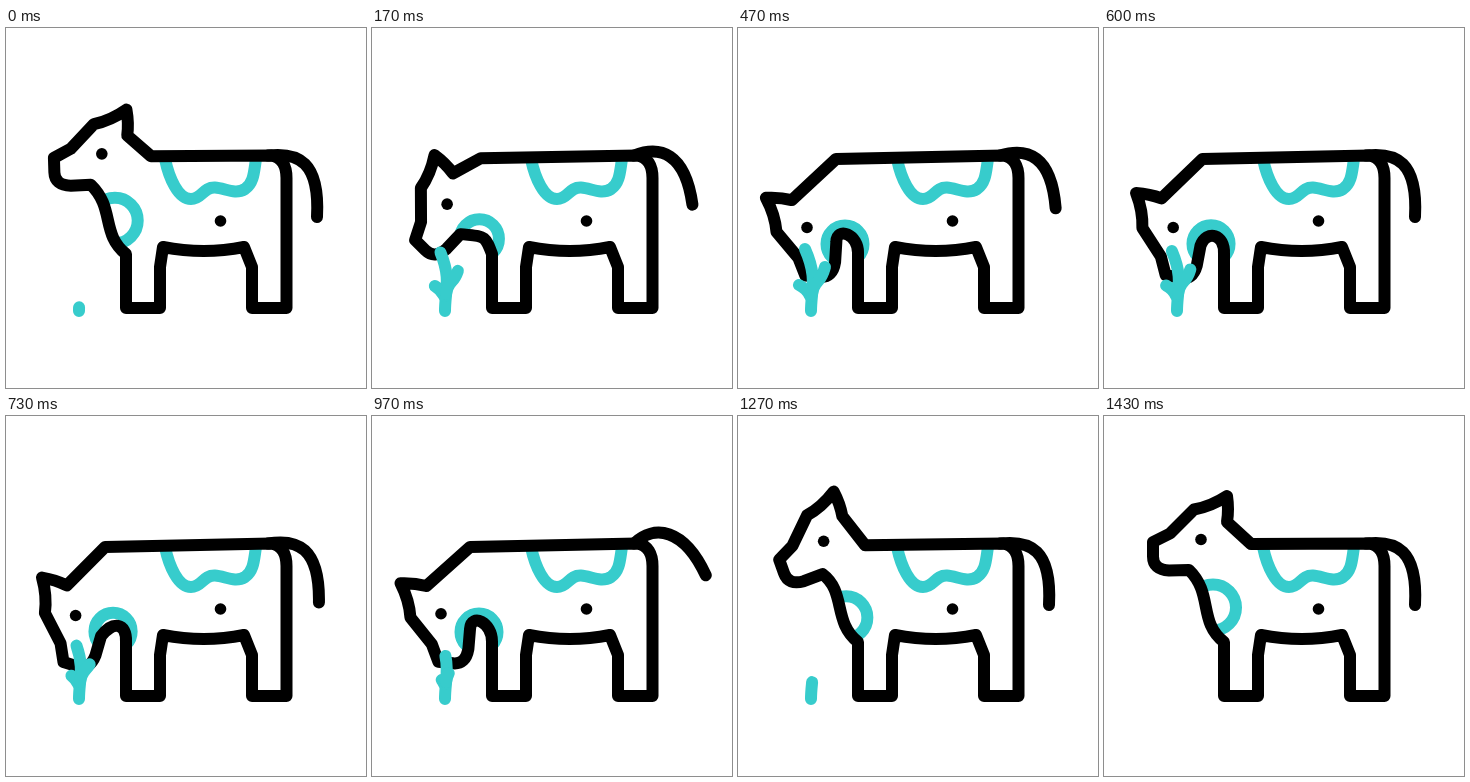
Recreate the animation shown at these times as an HTML page. Size 360 px wide and 360 px high, loop 1670 ms.

```html
<!DOCTYPE html>
<html lang="en">
<head>
<meta charset="utf-8">
<title>Grazing cow</title>
<style>
  html, body { margin: 0; height: 100%; overflow: hidden; background: #fff; }
  svg { display: block; width: 100vw; height: 100vh; }
  path, circle { fill: none; stroke-width: 12; stroke-linecap: round; stroke-linejoin: round; }
  .ink { stroke: #000; }
  .teal { stroke: #37cccc; }
  .dot { fill: #000; }
</style>
</head>
<body>
<svg viewBox="0 0 360 360">
  <clipPath id="inside"><path id="bodyClip"/></clipPath>
  <path class="teal" d="M159 131C163 150 172 171 185 171C196 171 197 159 209 159.500C219 160 229 167 239 161C248 155 248 143 250 131"/>
  <g clip-path="url(#inside)"><circle id="spot" class="teal"/></g>
  <path id="body" class="ink"/>
  <path id="tail" class="ink"/>
  <circle id="eye" class="dot" r="5.8"/>
  <circle class="dot" cx="214.5" cy="193" r="5.8"/>
  <g id="grass" class="teal">
    <path pathLength="1" d="M73 283C73 262 80 250 67 221"/>
    <path pathLength="1" d="M72 268Q69 261 61 257"/>
    <path pathLength="1" d="M74 266C77 250 82 258 87 239"/>
  </g>
</svg>
<script>
const LOOP = 1670, FPS = 30;
const $ = id => document.getElementById(id);
const mix = (a, b, k) => a + (b - a) * k;

// Smooth step from 0 to 1, and a single pulse, between two moments
const progress = (f, from, to) => Math.min(Math.max((f - from) / (to - from), 0), 1);
const ease = (f, from, to) => { const u = progress(f, from, to); return u * u * (3 - 2 * u); };
const pulse = (f, from, to) => Math.sin(Math.PI * progress(f, from, to)) ** 2;

function set(id, attributes) {
  for (const name in attributes) $(id).setAttribute(name, attributes[name]);
}

// The head is rigid: it turns around the eye (nod) while the eye sinks (drop).
function drawCow(f) {
  const nod = ease(f, -1, 10.5) - ease(f, 28, 42.5) - .15 * pulse(f, 14, 29);
  const drop = ease(f, -1, 8.5) - ease(f, 28, 39);
  const reach = 1 - (1 - nod) ** 2;
  const eye = { x: mix(97, 69, reach), y: mix(123.5, 199.5, drop) };
  const turn = -nod * 85 * Math.PI / 180, cos = Math.cos(turn), sin = Math.sin(turn);
  const at = (x, y) => [eye.x + x * cos - y * sin, eye.y + x * sin + y * cos];

  const jaw = at(-12, 30.5);
  const bend = mix(44, -90, nod * nod) * Math.PI / 180, pull = mix(34, 16, nod);
  const throat = [jaw[0] + pull * Math.cos(bend), jaw[1] + pull * Math.sin(bend)];

  const d = [
    'M120 226C', mix(94, 121, drop), 206, throat, jaw,
    'L', at(-32, 31), 'Q', at(-48, 30), at(-48, 17),        // chin
    'L', at(-48, 2.5), at(-31, -6), at(-7, -30),            // muzzle and brow
    'Q', at(10, -33), at(26, -43.5),                        // ear
    'Q', at(28, -30), at(26, -17.5),
    'L', mix(147, 98, reach), mix(128, 131, reach),
    'L265 127.500C276 129 280.500 138 280.500 150V280H246V239L238 219',
    'Q198 227 157 219L154 239V280H120Z'
  ].join(' ');
  set('body', { d });
  set('bodyClip', { d });
  set('eye', { cx: eye.x, cy: eye.y });
  set('spot', { cx: mix(109, 107, reach), cy: mix(191.5, 216, reach), r: mix(23, 18.5, reach) });
}

function drawTail(f) {
  const swing = .7 * pulse(f, 0, 18) + pulse(f, 20.5, 36.5);
  const point = (x, y, swungX, swungY) => [mix(x, swungX, swing), mix(y, swungY, swing)];
  set('tail', {
    d: `M262 127.500C${point(292, 124, 282, 108)} ${point(314, 133, 312, 112)} ${point(311, 189, 334, 159)}`
  });
}

// Grass grows, is nibbled down, then withdraws; blades sprout from the upper half.
function drawGrass(f) {
  const stem = ease(f, -1, 6) * (1 - .32 * ease(f, 15, 30)) * (1 - ease(f, 34, 41));
  const blade = (stem - .55) / .45;
  [...$('grass').children].forEach((path, i) => {
    const grown = i ? blade : stem;
    path.style.display = grown > 0 ? '' : 'none';
    path.style.strokeDasharray = `${Math.max(grown, 0)} 2`;
  });
}

function render(time) {
  const f = Math.floor((time % LOOP + 4) * FPS / 1000);
  drawCow(f);
  drawTail(f);
  drawGrass(f);
}

const start = performance.now();
(function tick() {
  render(performance.now() - start);
  requestAnimationFrame(tick);
})();
</script>
</body>
</html>
```
